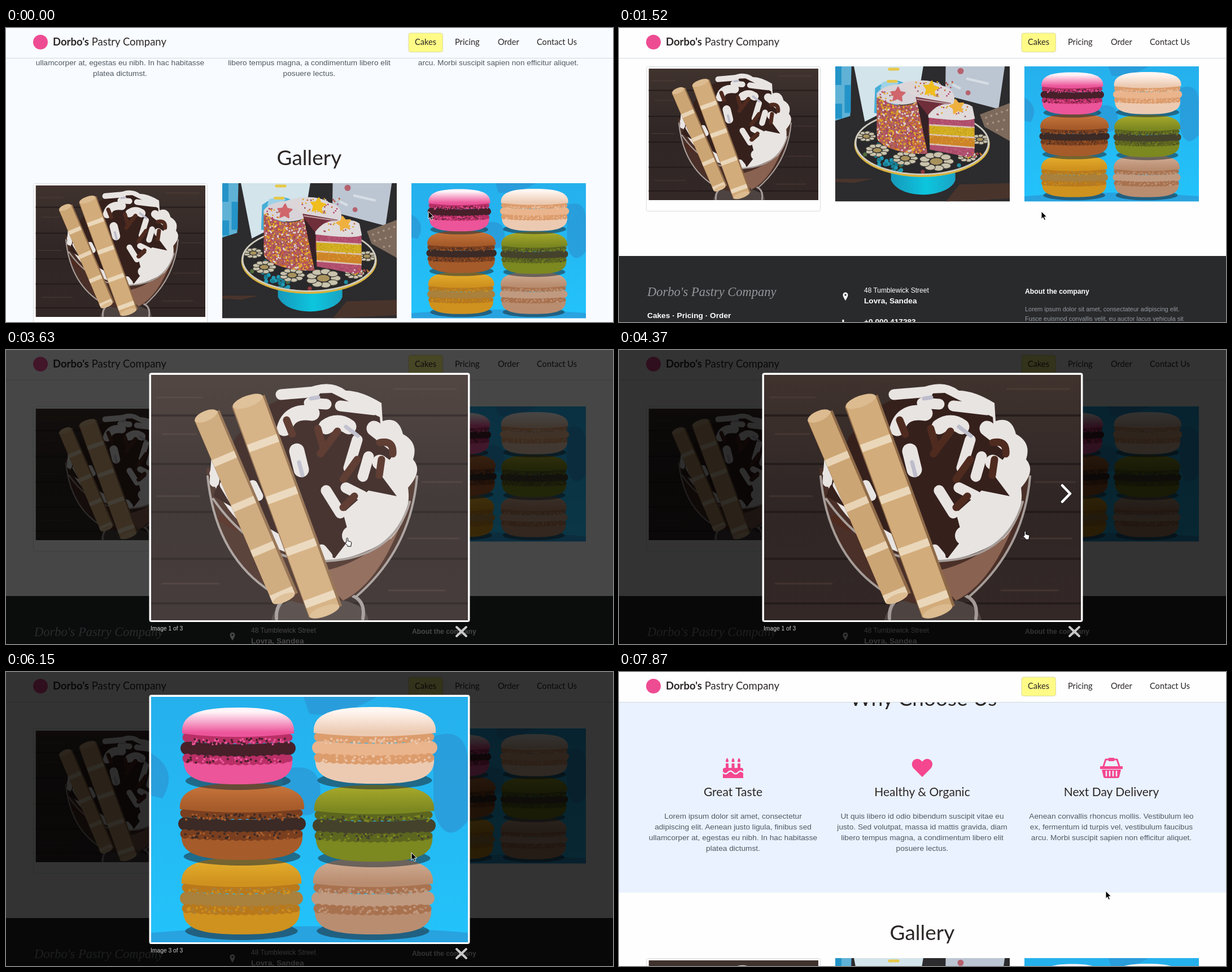
An HTML page for the animation above (8 s loop, 1075 px wide and 521 px high).

```html
<!DOCTYPE html>
<html lang="en">
<head>
<meta charset="utf-8">
<title>Bakery gallery</title>
<style>
  html, body { margin: 0; width: 100%; height: 100%; overflow: hidden; background: #fefefe; }
  svg { display: block; }
  #stage { width: 1075px; height: 521px; }
  text { font-family: "Liberation Sans", Arial, sans-serif; white-space: pre; }
  .lato { font-family: Lato, sans-serif; fill: #2b2626; }
  .mid { text-anchor: middle; }
  .h1 { font-size: 37px; }
  .h2 { font-size: 21px; }
  .nav { font-size: 14.6px; }
  .copy { font-size: 13.7px; fill: #4f5a61; }
  .bold { font-size: 13.7px; font-weight: bold; fill: #fff; }
  .note { font-size: 11px; fill: #92999f; }
  .line { fill: none; stroke-linecap: round; stroke-linejoin: round; }
</style>
</head>
<body>
<svg id="stage" viewBox="0 0 1075 521" xmlns="http://www.w3.org/2000/svg">
<defs>
  <linearGradient id="wood" x2="0" y2="1">
    <stop offset="0" stop-color="#40332e"/><stop offset=".5" stop-color="#2f2625"/><stop offset="1" stop-color="#332826"/>
  </linearGradient>
  <linearGradient id="foot">
    <stop offset="0" stop-color="#1798bb"/><stop offset=".55" stop-color="#0cc6de"/><stop offset="1" stop-color="#1aa3c4"/>
  </linearGradient>
  <linearGradient id="sky" x2="0" y2="1">
    <stop offset="0" stop-color="#25b0ec"/><stop offset="1" stop-color="#23c3fb"/>
  </linearGradient>
  <clipPath id="side"><path d="M133 88C160 130 240 135 262 112L297 281C230 285 150 265 134 232Z"/></clipPath>
  <clipPath id="slice"><path d="M301 156L448 168L448 280L434 293L304 268Z"/></clipPath>
  <clipPath id="plate"><ellipse cx="279" cy="246" rx="211" ry="99"/></clipPath>

  <symbol id="sundae" viewBox="0 0 561 435" preserveAspectRatio="none">
    <rect width="561" height="435" fill="url(#wood)"/>
    <path class="line" stroke="#1f1817" stroke-width="4" opacity=".7" d="M0 72H561M0 158H561M0 243H561M0 326H561M0 405H561"/>
    <path class="line" stroke="#54423a" stroke-width="3" opacity=".5" d="M10 40H90M430 25H540M20 105H80M480 190H550M10 215H85M455 290H545M20 370H120M420 382H520"/>
    <path d="M213 435Q220 392 300 395T385 435Z" fill="#4d4340"/>
    <path class="line" stroke="#a39a97" stroke-width="6" d="M222 432Q220 400 250 392M375 432Q380 402 358 392"/>
    <path d="M98 165C104 290 185 404 290 408S460 290 472 165Z" fill="#4a3028"/>
    <path d="M290 350Q370 340 440 270Q400 370 340 400Z" fill="#8a6251"/>
    <path d="M103 175Q120 120 160 120L225 62Q235 25 270 27Q315 5 345 28Q372 28 408 50L410 82Q438 72 446 105Q474 120 464 150Q482 170 455 200Q462 250 425 290Q350 335 290 330Q150 300 103 175Z" fill="#e8e4e2"/>
    <path d="M205 55L245 35L320 32L405 75L408 110L430 140L405 175L435 215L385 205L340 245L352 290L325 325L240 290L110 215L150 110Z" fill="#35201c"/>
    <g class="line" stroke="#e8e4e2">
      <path stroke-width="27" d="M236 95Q245 62 285 68M258 135L266 168M310 92Q330 78 350 92M395 95L440 130M405 155L440 180"/>
      <path stroke-width="19" d="M230 35L290 30M335 55L395 62M365 115L350 165M385 145L375 180M310 205L335 245M345 200L375 215M302 310L312 322M280 50L310 52"/>
      <path stroke-width="34" d="M365 255L430 235M355 285L405 275"/>
      <path stroke-width="17" d="M115 150L112 190M130 195L160 245M180 195L190 215"/>
    </g>
    <g class="line" stroke="#4f2a1f">
      <path stroke-width="13" d="M295 95L305 130M330 100L300 140M405 120Q430 115 428 140M408 150L404 178M365 150L340 185M240 80L250 105M340 235L360 215M125 255L150 270"/>
    </g>
    <path class="line" stroke="#bcbccb" stroke-width="7" d="M345 92L366 108M262 155L268 178M283 42L296 40"/>
    <path class="line" stroke="#a69d99" stroke-width="4" d="M100 180Q115 330 225 392M471 180Q460 310 362 394M110 220Q190 335 310 330T458 225"/>
    <g fill="none">
      <path stroke="#8e6a48" stroke-width="48" d="M99 72L238 396"/>
      <path stroke="#cca574" stroke-width="43" d="M97 72L235 396"/>
      <path stroke="#e8d3b5" stroke-width="43" stroke-dasharray="13 74" stroke-dashoffset="10" d="M97 72L235 396"/>
      <path stroke="#8e6a48" stroke-width="62" d="M172 46L309 420"/>
      <path stroke="#d3ac7b" stroke-width="56" d="M171 46L307 420"/>
      <path stroke="#ead7ba" stroke-width="56" stroke-dasharray="14 84" stroke-dashoffset="25" d="M171 46L307 420"/>
    </g>
    <g fill="#dcbb90">
      <ellipse cx="97" cy="73" rx="21" ry="9" transform="rotate(-23 97 73)"/>
      <ellipse cx="171" cy="47" rx="28" ry="10" transform="rotate(-20 171 47)"/>
      <ellipse cx="235" cy="396" rx="21" ry="7" transform="rotate(-23 235 396)"/>
      <ellipse cx="307" cy="419" rx="28" ry="9" transform="rotate(-20 307 419)"/>
    </g>
  </symbol>

  <symbol id="cake" viewBox="0 0 561 435" preserveAspectRatio="none">
    <rect width="561" height="435" fill="#2c2b2d"/>
    <path d="M0 0H52L48 160L0 175Z" fill="#5fb2d6"/>
    <path d="M0 0H20V60H0ZM30 60H50V150H30ZM0 120H22V168H0Z" fill="#2494c8"/>
    <path d="M60 0H283L268 90L95 178Z" fill="#d3e4eb"/>
    <path d="M128 70Q180 30 225 55L190 160L125 150Z" fill="#46aed6"/>
    <path d="M150 52Q185 40 205 52L180 75L145 72Z" fill="#9fd2e6"/>
    <path class="line" stroke="#e6c84a" stroke-width="9" d="M174 9H202M170 48H196"/>
    <path d="M355 0H545L525 137L354 92Z" fill="#bcc6d2"/>
    <path class="line" stroke="#d7dde5" stroke-width="8" d="M425 40L490 55M380 60L400 70"/>
    <g fill="#b5626d"><circle cx="403" cy="15" r="10"/><circle cx="427" cy="85" r="8"/></g>
    <path d="M465 155L561 118V240L480 195Z" fill="#7d6a5c"/>
    <path class="line" stroke="#a89280" stroke-width="7" stroke-dasharray="0 18" d="M485 165L555 140M490 185L555 170M520 205L555 200"/>
    <path d="M0 362H120L60 375L0 372ZM355 435L400 380L561 376V425Z" fill="#49342c"/>
    <path d="M179 340V366C195 400 240 413 282 413S375 398 386 366V340Z" fill="url(#foot)"/>
    <ellipse cx="279" cy="251" rx="218" ry="105" fill="#d8b23c"/>
    <ellipse cx="279" cy="246" rx="217" ry="104" fill="#cfccc0"/>
    <ellipse cx="279" cy="246" rx="211" ry="99" fill="#29282a"/>
    <g id="flowers" clip-path="url(#plate)"></g>
    <path d="M133 90Q150 62 200 58Q290 30 345 62Q388 72 383 118L320 190L262 112Z" fill="#dcd6d9"/>
    <path d="M258 98L372 118L320 170L300 215L294 250Z" fill="#6f2f3a"/>
    <path d="M262 112L300 160L297 280Z" fill="#352126"/>
    <path d="M262 105L375 122" stroke="#b9989c" stroke-width="4"/>
    <path d="M133 88C160 130 240 135 262 112L297 281C230 285 150 265 134 232Z" fill="#b0605f"/>
    <path d="M133 88Q150 62 200 60L258 98L262 114Q200 138 133 100Z" fill="#d8d3d8"/>
    <g clip-path="url(#slice)">
      <path d="M300 150H450V300H300Z" fill="#b14f6e"/>
      <path d="M299 188L450 197V262L302 250Z" fill="#d0ad20"/>
      <path d="M299 221L450 230V264L302 250Z" fill="#cf8429"/>
      <path class="line" stroke="#dcc3b6" stroke-width="5" d="M302 188L448 197M302 219L448 229M303 250L448 262"/>
      <g id="texture"></g>
    </g>
    <path d="M299 156Q330 118 360 122Q420 112 441 130L449 168Q420 180 299 165Z" fill="#dfdadb"/>
    <g id="sprinkles" clip-path="url(#side)"></g>
    <g id="crumbs"></g>
    <g id="stars"></g>
  </symbol>

  <symbol id="macarons" viewBox="0 0 561 435" preserveAspectRatio="none">
    <rect width="561" height="435" fill="url(#sky)"/>
    <g fill="#2c93d2" opacity=".65">
      <path d="M270 0H400Q330 40 280 30ZM500 70Q561 50 561 120V220Q520 270 500 200ZM230 130Q300 110 300 170T240 200Z"/>
      <path d="M0 100Q50 130 20 180L0 175ZM0 435V418Q280 395 561 418V435Z"/>
    </g>
    <g id="stack"></g>
  </symbol>
</defs>

<rect id="paper" width="1075" height="521"/>
<g id="page">
  <rect id="band" y="-400" width="1075" height="559" fill="#eaf2ff"/>
  <text class="lato mid h1" x="539" y="-172">Why Choose Us</text>
  <g fill="#f4478f">
    <g transform="translate(202 -62)">
      <path d="M-13-8h5V1h-5zM-2.5-8h5V1h-5zM8-8h5V1h-5zM-10.5-18q5 7 0 8q-5-1 0-8zM0-18q5 7 0 8q-5-1 0-8zM10.5-18q5 7 0 8q-5-1 0-8zM-18 18V3q0-3 3-3h30q3 0 3 3v15z"/>
      <path class="line" stroke="#eaf2ff" stroke-width="2.5" d="M-18 8q4.5 5 9 0t9 0t9 0t9 0"/>
    </g>
    <path transform="translate(537 -62)" d="M0 16L-15 1C-22-7-16-16-9-16C-5-16-2-14 0-11C2-14 5-16 9-16C16-16 22-7 15 1Z"/>
    <g transform="translate(872 -62)">
      <path class="line" stroke="#f4478f" stroke-width="3" d="M-14-3L-10-15H10L14-3"/>
      <path d="M-5-18H5V-12H-5ZM-20-3H20V2H-20ZM-17 3H17L14 16Q13 18 11 18H-11Q-13 18-14 16Z"/>
      <path class="line" stroke="#eaf2ff" stroke-width="2.5" d="M-9 6V14M-3 6V14M3 6V14M9 6V14"/>
    </g>
  </g>
  <g id="features"></g>
  <text class="lato mid h1" x="537" y="243">Gallery</text>
  <rect x="48.5" y="275.5" width="308" height="256" rx="3" fill="#fff" stroke="#dadcdf"/>
  <use href="#sundae" x="52.5" y="279" width="300.5" height="233"/>
  <use href="#cake" x="383" y="275" width="309" height="239.5"/>
  <use href="#macarons" x="718" y="275" width="309" height="239.5"/>

  <rect y="611" width="1075" height="500" fill="#292a2c"/>
  <text x="50" y="682" style="font:italic 22.5px 'Liberation Serif',serif" fill="#93979b">Dorbo's Pastry Company</text>
  <text class="bold" x="50" y="721">Cakes · Pricing · Order</text>
  <path d="M401 690Q396.5 683 396.5 680a4.5 4.5 0 0 1 9 0Q405.5 683 401 690Z" fill="#fff"/>
  <circle cx="401" cy="680" r="1.7" fill="#292a2c"/>
  <text x="434" y="676" font-size="12" fill="#fff">48 Tumblewick Street</text>
  <text class="bold" x="434" y="695">Lovra, Sandea</text>
  <path class="line" stroke="#fff" stroke-width="3" d="M397 725Q396 735 406 735"/>
  <text class="bold" x="434" y="732">+0 000 417283</text>
  <text x="719" y="677.5" font-size="12.2" font-weight="bold" fill="#fff">About the company</text>
  <text class="note" x="719" y="709">Lorem ipsum dolor sit amet, consectateur adipiscing elit.</text>
  <text class="note" x="719" y="726">Fusce euismod convallis velit, eu auctor lacus vehicula sit</text>
  <text class="note" x="719" y="743">amet.</text>
</g>

<rect id="bar" width="1075" height="53"/>
<path d="M0 53.5H1075" stroke="#d3d9de"/>
<circle cx="61" cy="25" r="13" fill="#ee4c92"/>
<text class="lato" x="83" y="31" font-size="18.5"><tspan font-weight="bold">Dorbo's</tspan> Pastry Company</text>
<rect x="713" y="9" width="60.5" height="33.5" rx="4" fill="#fffb86" stroke="#dcd9a4"/>
<g class="nav">
  <text class="lato" x="724" y="30">Cakes</text>
  <text class="lato" x="795" y="30">Pricing</text>
  <text class="lato" x="871" y="30">Order</text>
  <text class="lato" x="940" y="30">Contact Us</text>
</g>

<rect id="shade" width="1075" height="521"/>
<g id="box">
  <rect x="253.5" y="40.5" width="568" height="441.5" rx="4" fill="#fff"/>
  <use class="shot" href="#sundae" x="257" y="44" width="561" height="435"/>
  <use class="shot" href="#cake" x="257" y="44" width="561" height="435"/>
  <use class="shot" href="#macarons" x="257" y="44" width="561" height="435"/>
  <g id="next" class="line">
    <path d="M785 240L799 254.5L785 269" stroke="#222" stroke-width="7" opacity=".3"/>
    <path d="M785 240L799 254.5L785 269" stroke="#fff" stroke-width="4.5"/>
  </g>
  <text id="caption" x="256" y="497" font-size="10.3" fill="#ccc"></text>
  <path class="line" stroke="#c9c9c9" stroke-width="4" d="M798 491L815 507M815 491L798 507"/>
</g>

<g id="cursor">
  <path id="arrow" fill="#000" stroke="#fff" d="M0 0V13.5L3 10.7L5.2 15.5L7.5 14.5L5.4 9.8H9.6Z"/>
  <path id="hand" fill="#fff" stroke="#000" transform="translate(-4 0)" d="M3 8V1.5a1.3 1.3 0 0 1 2.6 0V5.5l5 1.3q1.4.5 1.2 2L11 13v2H5v-1.5L1 9.5q-.6-1.6 1-1.7z"/>
</g>
</svg>

<script>
const $ = id => document.getElementById(id);
const add = (id, markup) => $(id).insertAdjacentHTML('beforeend', markup);

let seed = 7;
const rnd = (lo, hi) => {
  seed = (seed * 16807) % 2147483647;
  return +(lo + (hi - lo) * seed / 2147483647).toFixed(1);
};

// Feature columns
[
  [202, 'Great Taste', ['Lorem ipsum dolor sit amet, consectetur', 'adipiscing elit. Aenean justo ligula, finibus sed',
    'ullamcorper at, egestas eu nibh. In hac habitasse', 'platea dictumst.']],
  [537, 'Healthy &amp; Organic', ['Ut quis libero id odio bibendum suscipit vitae eu', 'justo. Sed volutpat, massa id mattis gravida, diam',
    'libero tempus magna, a condimentum libero elit', 'posuere lectus.']],
  [872, 'Next Day Delivery', ['Aenean convallis rhoncus mollis. Vestibulum leo', 'ex, fermentum id turpis vel, vestibulum faucibus',
    'arcu. Morbi suscipit sapien non efficitur aliquet.']]
].forEach(([x, title, lines]) => {
  add('features', `<text class="lato mid h2" x="${x}" y="-12">${title}</text>` +
    lines.map((s, i) => `<text class="copy mid" x="${x}" y="${28 + i * 19}">${s}</text>`).join(''));
});

// Scattered dots, one path per colour
function scatter(id, n, colours, size, x0, y0, x1, y1) {
  const paths = colours.map(() => '');
  for (let i = 0; i < n; i++) paths[i % colours.length] += `M${rnd(x0, x1)} ${rnd(y0, y1)}h.1`;
  paths.forEach((d, i) => add(id, `<path class="line" stroke="${colours[i]}" stroke-width="${size}" d="${d}"/>`));
}
const candy = ['#d9a522', '#b4426c', '#dcd3d4', '#c9652c', '#e0a92a', '#9c4a55'];
scatter('sprinkles', 1000, candy, 6, 130, 92, 300, 285);
scatter('crumbs', 45, candy, 5, 255, 48, 380, 98);
scatter('crumbs', 20, candy, 5, 140, 78, 185, 112);
scatter('crumbs', 22, candy, 5, 325, 125, 440, 165);
scatter('crumbs', 16, candy, 5, 420, 275, 470, 298);
scatter('texture', 90, ['#c56d86', '#963c58'], 3, 300, 160, 450, 186);
scatter('texture', 90, ['#c56d86', '#963c58'], 3, 300, 264, 450, 292);
scatter('texture', 160, ['#e2c13c', '#b98a1d'], 3, 300, 196, 450, 252);
scatter('flowers', 26, ['#1f8ba0', '#1f8ba0', '#8f3b3f', '#4f6b3c'], 13, 70, 190, 490, 345);
scatter('flowers', 24, ['#1f9bb4', '#177d92'], 13, 130, 295, 220, 340);

function flower(x, y, r) {
  const petals = Array.from({ length: 9 }, (_, i) => {
    const a = i * Math.PI * 2 / 9, dx = Math.cos(a) * r * .6, dy = Math.sin(a) * r * .33;
    return `<ellipse cx="${x + dx}" cy="${y + dy}" rx="${r * .25}" ry="${r * .14}"/>`;
  });
  add('flowers', `<g fill="#c9c2ac" stroke="#3c3a36" stroke-width="2">${petals.join('')}
    <ellipse cx="${x}" cy="${y}" rx="${r * .32}" ry="${r * .18}" fill="#a8925c"/></g>`);
}
[[100, 225, 36], [135, 270, 45], [225, 296, 48], [325, 306, 66], [425, 290, 38], [465, 235, 36]].forEach(f => flower(...f));

function star(x, y, r, turn, fill) {
  const pts = Array.from({ length: 10 }, (_, i) => {
    const a = turn + i * Math.PI / 5, q = i % 2 ? r * .52 : r;
    return `${x + Math.sin(a) * q},${y - Math.cos(a) * q}`;
  });
  add('stars', `<polygon points="${pts.join(' ')}" fill="${fill}" stroke="${fill}" stroke-width="4" stroke-linejoin="round"/>`);
}
star(201, 91, 24, .05, '#d0656c');
star(307, 72, 25, .15, '#efbd1e');
star(391, 130, 24, -.2, '#eeb03f');

// Macarons: centre, width, then highlight, shell, ruffle and filling
[
  [160, 353, 212, '#e3ac2c', '#cf921e', '#b9791b', '#a9803c'],
  [393, 353, 212, '#cfaa90', '#b98d70', '#a9724f', '#c09a80'],
  [161, 221, 220, '#c4733a', '#a65b2a', '#7a3f1f', '#3b2a26'],
  [395, 224, 212, '#a3a52a', '#7c8820', '#5c661f', '#45422c'],
  [154, 87, 198, '#fff4f8', '#ec559a', '#b92f66', '#47202a'],
  [396, 86, 216, '#fff6f1', '#eccab2', '#dc9c6c', '#eab48c']
].forEach(([x, y, w, light, shell, ruffle, cream], i) => {
  const a = w / 2, b = a - 9;
  const edge = (v, dip) => `M${-b} ${v}Q0 ${v + dip} ${b} ${v}`;
  const frill = d => `<path class="line" stroke="${ruffle}" stroke-width="13" d="${d}"/>` +
    `<path class="line" stroke="${ruffle}" stroke-width="17" stroke-dasharray="0 13" d="${d}"/>`;
  add('stack', `<linearGradient id="m${i}" x2="0" y2="1"><stop offset=".15" stop-color="${light}"/><stop offset=".85" stop-color="${shell}"/></linearGradient>
    <g transform="translate(${x} ${y})">
      <ellipse cy="62" rx="${a * .94}" ry="16" fill="#1c2a33" opacity=".55"/>
      <path d="M${-a + 3} 22C${-a} 58 ${-a * .7} 68 0 68S${a} 58 ${a - 3} 22Z" fill="${shell}"/>
      <path class="line" stroke="${cream}" stroke-width="24" d="${edge(4, 10)}"/>
      ${frill(edge(22, 8))}${frill(edge(-15, 8))}
      <path d="M${-a} -22C${-a - 3} -56 ${-a * .7} -68 0 -68S${a + 3} -56 ${a} -22Q0 -10 ${-a} -22Z" fill="url(#m${i})"/>
    </g>`);
  scatter('stack', 70, [shell, cream], 4, x - b, y - 13, x + b, y - 3);
  scatter('stack', 50, [shell, cream], 4, x - b, y + 19, x + b, y + 30);
});

// Held steps: each row starts at its first value (ms)
const scroll = [[0, 0], [150, 45], [310, 112], [470, 174], [620, 215], [770, 240], [920, 254], [1070, 260],
  [1370, 236], [1520, 207], [1660, 188], [1810, 178], [1960, 175], [7540, 40], [7700, -120], [7870, -232]];
const shade = [[0, 0], [3150, .25], [3330, .5], [3630, .72], [3870, .8], [6500, .65], [6680, .35], [6860, 0]];
// time, frame opacity, picture, picture opacity, caption, next arrow
const box = [[0, 0, 0, 0, 0, 0], [3630, 1, 0, .9, 1, 0], [3870, 1, 0, 1, 1, 0], [4210, 1, 0, 1, 1, 1],
  [4810, 1, 1, 0, 0, 0], [4970, 1, 1, .45, 0, 0], [5140, 1, 1, .86, 1, 1], [5320, 1, 1, 1, 1, 1],
  [5470, 1, 2, 0, 0, 0], [5630, 1, 2, .45, 0, 0], [5790, 1, 2, .86, 1, 0], [5970, 1, 2, 1, 1, 0],
  [6500, .6, 2, 1, 1, 0], [6680, 0, 2, 1, 0, 0]];
// time, x, y, hand
const cursor = [[0, 748, 325, 0], [1660, 560, 312, 0], [1810, 320, 275, 1], [1960, 136, 244, 1], [2850, 221, 283, 1],
  [3630, 604, 333, 1], [4050, 655, 328, 1], [4210, 700, 323, 1], [4370, 719, 321, 1], [5790, 718, 320, 0],
  [6300, 805, 495, 1], [6860, 805, 495, 0], [7070, 842, 430, 0], [7220, 862, 388, 0]];

const at = (rows, t) => rows.findLast(r => r[0] <= t);
const show = (el, v) => el.setAttribute('opacity', v);
const shots = document.querySelectorAll('.shot');

function draw(now) {
  const t = now % 8000;
  $('page').setAttribute('transform', `translate(0 ${-at(scroll, t)[1]})`);
  $('paper').setAttribute('fill', t < 150 ? '#f8fbff' : '#fefefe');
  $('bar').setAttribute('fill', t < 1370 ? '#f8fbff' : '#fefefe');
  show($('band'), t < 7540 ? 0 : 1);
  show($('shade'), at(shade, t)[1]);

  const [, frame, pic, fade, label, next] = at(box, t);
  show($('box'), frame);
  shots.forEach((el, i) => show(el, i === pic ? fade : 0));
  $('caption').textContent = label ? `Image ${pic + 1} of 3` : '';
  show($('next'), next);

  const [, x, y, hand] = at(cursor, t);
  $('cursor').setAttribute('transform', `translate(${x} ${y})`);
  show($('hand'), hand);
  show($('arrow'), 1 - hand);
  requestAnimationFrame(draw);
}
requestAnimationFrame(draw);
</script>
</body>
</html>
```
